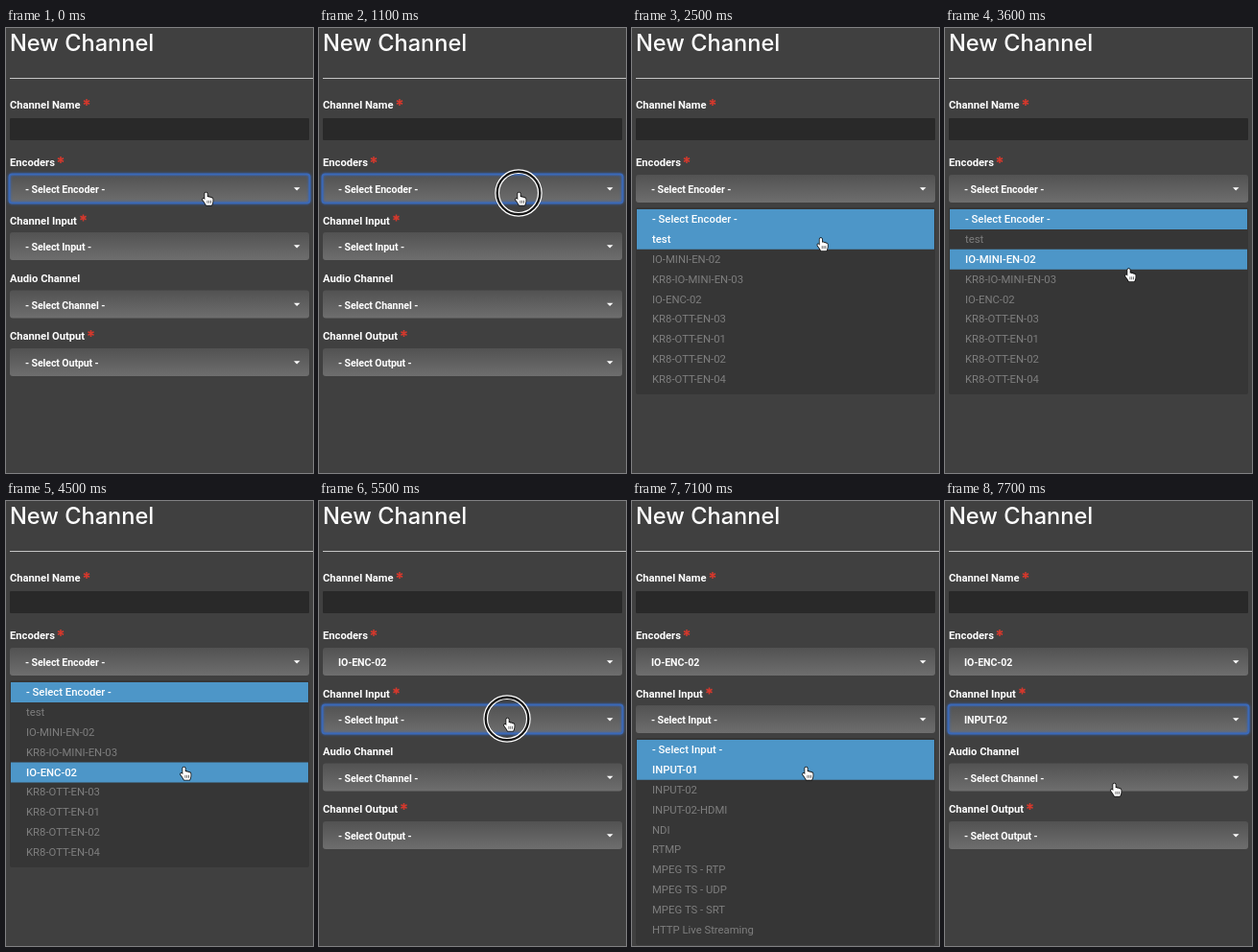
Write an HTML page with a canvas that moves like this. It is 320x464 px and loops after 8 s.

```html
<!DOCTYPE html>
<html lang="en">
<head>
<meta charset="utf-8">
<title>New Channel</title>
<style>
html, body { margin: 0; width: 320px; height: 464px; overflow: hidden; background: #404040; }
canvas { display: block; }
</style>
</head>
<body>
<canvas width="320" height="464"></canvas>
<script>
const ctx = document.querySelector('canvas').getContext('2d');
const LOOP = 8000, STEP = 100, ROW = 20.89, OPEN_DELAY = 200, FADE = 400;

const encoders = ['- Select Encoder -', 'test', 'IO-MINI-EN-02', 'KR8-IO-MINI-EN-03', 'IO-ENC-02',
  'KR8-OTT-EN-03', 'KR8-OTT-EN-01', 'KR8-OTT-EN-02', 'KR8-OTT-EN-04'];
const inputs = ['- Select Input -', 'INPUT-01', 'INPUT-02', 'INPUT-02-HDMI', 'NDI', 'RTMP',
  'MPEG TS - RTP', 'MPEG TS - UDP', 'MPEG TS - SRT', 'HTTP Live Streaming'];

// press: opens the list, pick: chooses an item
const menus = [
  { y: 153, items: encoders, press: 1100, pick: 4600, choice: 4 },
  { y: 213, items: inputs, press: 5500, pick: 7500, choice: 2 }
];
const clicks = menus.flatMap(m => [m.press, m.pick]);

// cursor tip: time, x, y
const path = [
  [0, 208, 172], [1700, 208, 172], [1900, 205, 194], [2100, 198, 209], [2200, 198, 209],
  [3100, 193, 240], [3600, 191, 251.5], [4000, 188, 260], [4400, 185, 278], [5000, 185, 278],
  [5200, 196, 227], [6500, 196, 227], [7300, 176, 295], [LOOP, 176, 295]
];
const hand = new Path2D('M-1.2 1.2Q0-.6 1.2 1.2V5Q2.6 4 3.2 5.4Q4.6 4.6 5.2 6Q6.8 5.4 7 7V9.5' +
  'Q6.8 11.5 5.8 13.5H.2Q-1 11-3.4 8Q-3.6 6.2-2.2 6.8L-1.2 8Z');

function cursorAt(t) {
  const i = path.findIndex(p => p[0] > t);
  const [t0, x0, y0] = path[i - 1], [t1, x1, y1] = path[i];
  const k = (t - t0) / (t1 - t0);
  return { x: x0 + (x1 - x0) * k, y: y0 + (y1 - y0) * k };
}

function text(str, x, y, font, color = '#fff', spacing = 0) {
  ctx.font = font;
  ctx.letterSpacing = spacing + 'px';
  ctx.fillStyle = color;
  ctx.fillText(str, x, y);
}

function box(x, y, w, h, r, fill) {
  ctx.beginPath();
  ctx.roundRect(x, y, w, h, r);
  ctx.fillStyle = fill;
  ctx.fill();
}

function label(str, y, starX) {
  text(str, 4, y + 4, '700 11.2px Roboto, sans-serif');
  if (!starX) return;
  ctx.beginPath();
  for (let i = 0; i < 3; i++) {
    const a = Math.PI / 2 + i * Math.PI / 3, dx = 3.5 * Math.cos(a), dy = 3.5 * Math.sin(a);
    ctx.moveTo(starX - dx, y - 2.5 - dy);
    ctx.lineTo(starX + dx, y - 2.5 + dy);
  }
  ctx.strokeStyle = '#d5382c';
  ctx.lineWidth = 1.5;
  ctx.stroke();
}

function select(str, y, focused) {
  const shade = ctx.createLinearGradient(0, y, 0, y + 29);
  shade.addColorStop(0, '#525252');
  shade.addColorStop(1, '#6e6e6e');
  box(4, y, 312, 29, 3, shade);
  if (focused) {
    ctx.save();
    ctx.beginPath();
    ctx.roundRect(3.5, y - 0.5, 313, 30, 3);
    ctx.shadowColor = '#3767bd';
    ctx.shadowBlur = 3;
    ctx.strokeStyle = '#3b69b8';
    ctx.lineWidth = 2;
    ctx.stroke();
    ctx.restore();
  }
  text(str, 20, y + 19, '700 10.6px Roboto, sans-serif', '#fff', -0.1);
  ctx.beginPath();
  ctx.moveTo(300, y + 13.3);
  ctx.lineTo(306.5, y + 13.3);
  ctx.lineTo(303.2, y + 16.6);
  ctx.fill();
}

function dropdown({ y, items, press }, t, tip) {
  const top = y + 36;
  box(4, top - 2, 312, items.length * ROW + 7, 2, '#363636');
  const hovered = Math.floor((tip.y - top) / ROW);
  items.forEach((item, i) => {
    const rowY = top + i * ROW, lit = i === 0 || i === hovered;
    if (lit) {
      ctx.globalAlpha = i ? 1 : Math.min(1, (t - press - OPEN_DELAY) / FADE);
      box(5, rowY, 310, ROW, 0, '#4d96c8');
      ctx.globalAlpha = 1;
    }
    text(item, 21, rowY + 14, `${lit ? 500 : 400} 11.3px Roboto, sans-serif`, lit ? '#fff' : '#7e7e7e');
  });
}

// white band split by a dark line
function clickRing(tip, age) {
  ctx.globalAlpha = 1 - age / OPEN_DELAY;
  ctx.beginPath();
  ctx.arc(tip.x, tip.y, 22.3, 0, 7);
  ctx.strokeStyle = '#fff';
  ctx.lineWidth = 4.8;
  ctx.stroke();
  ctx.strokeStyle = '#161616';
  ctx.lineWidth = 2.4;
  ctx.stroke();
  ctx.globalAlpha = 1;
}

function drawCursor({ x, y }) {
  ctx.save();
  ctx.translate(x + 0.5, y - 0.7);
  ctx.lineWidth = 1.6;
  ctx.lineJoin = 'round';
  ctx.strokeStyle = '#111';
  ctx.stroke(hand);
  ctx.fillStyle = '#fff';
  ctx.fill(hand);
  ctx.beginPath();
  for (const lx of [1.4, 3.2, 5]) {
    ctx.moveTo(lx, 8.5);
    ctx.lineTo(lx, 11.5);
  }
  ctx.lineWidth = 0.6;
  ctx.stroke();
  ctx.restore();
}

function draw(t) {
  const tip = cursorAt(t);
  const isPicked = m => t >= m.pick + OPEN_DELAY;
  const isOpen = m => t >= m.press + OPEN_DELAY && !isPicked(m);
  const value = m => m.items[isPicked(m) ? m.choice : 0];
  const [enc, inp] = menus;
  const active = t < inp.press ? enc : inp;

  box(0, 0, 320, 464, 0, '#404040');
  text('New Channel', 4, 23.5, '500 23.6px Inter, sans-serif');
  box(4, 52, 316, 1, 0, '#c4c4c4');

  label('Channel Name', 80, 84);
  box(4, 94, 312, 23, 1, '#292929');
  label('Encoders', 140, 57);
  label('Channel Input', 200.5, 80.5);
  label('Audio Channel', 261);
  label('Channel Output', 321, 88.5);
  for (const m of menus) select(value(m), m.y, m === active && !isOpen(m));
  select('- Select Channel -', 273.5);
  select('- Select Output -', 334);

  if (isOpen(active)) dropdown(active, t, tip);
  const click = clicks.find(c => t >= c && t < c + OPEN_DELAY);
  if (click !== undefined) clickRing(tip, t - click);
  drawCursor(tip);
}

const start = performance.now();
function tick() {
  const t = (performance.now() - start) % LOOP;
  draw(Math.floor(t / STEP) * STEP);
  requestAnimationFrame(tick);
}
tick();
</script>
</body>
</html>
```
